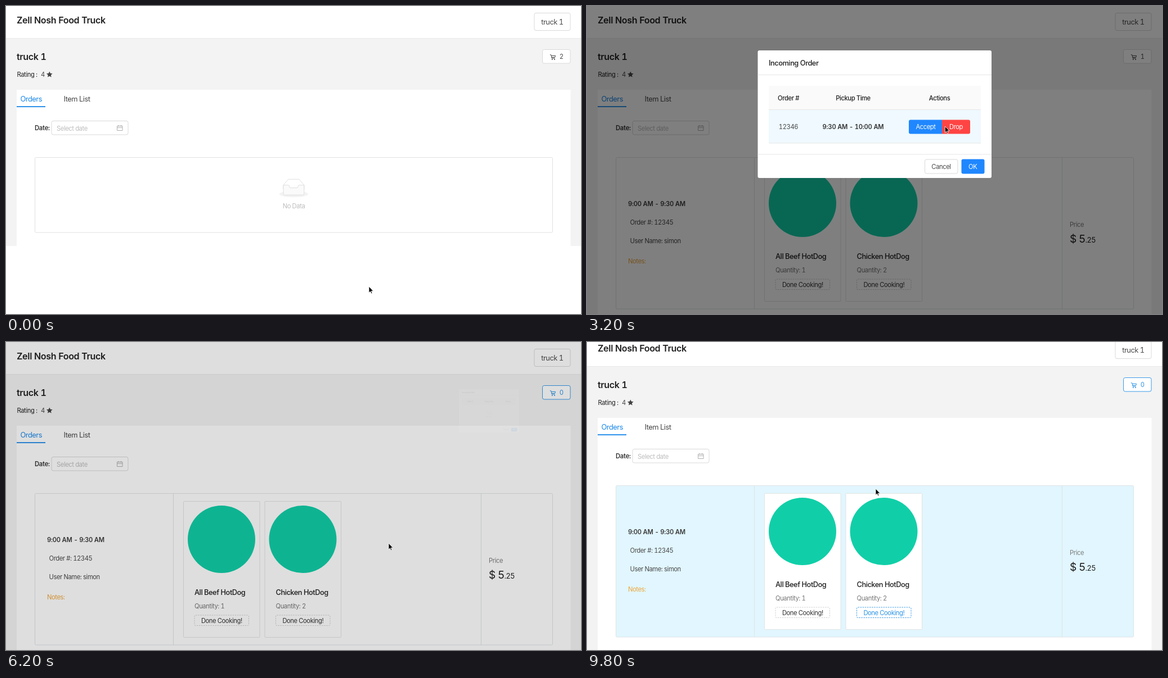
An HTML page for the animation above (10000 ms loop, 1022 by 548 pixels).

```html
<!DOCTYPE html>
<html lang="en">
<head>
<meta charset="utf-8">
<title>Food truck orders</title>
<style>
  html, body { margin: 0; width: 100%; height: 100%; overflow: hidden; background: #fff; }
  svg { display: block; width: 100vw; height: 100vh; }
  text {
    font-family: Inter, Roboto, sans-serif;
    font-variant-numeric: tabular-nums;
    letter-spacing: -.036em;
    white-space: pre;
  }
  text[font-weight="600"] { letter-spacing: -.02em; }
</style>
</head>
<body>
<svg id="stage" viewBox="0 0 1022 548"></svg>
<script>
const stage = document.getElementById('stage');
const LOOP = 10000, STEP = 200;
const BLUE = '#1f87ff', LINK = '#1887e8', INK = '#484848', DARK = '#1f1f1f', PALE = '#bdbdbd', EDGE = '#d9d9d9', RULE = '#e6e6e6';

// Keys are [time, value, ...]; values run straight between them.
function at(keys, t, i = 1) {
  const n = keys.findIndex(k => k[0] > t);
  if (n < 0) return keys[keys.length - 1][i];
  if (n === 0) return keys[0][i];
  const a = keys[n - 1], b = keys[n];
  return a[i] + (b[i] - a[i]) * (t - a[0]) / (b[0] - a[0]);
}

const pointer = [
  [0, 645, 499], [200, 650, 490], [600, 830, 270], [1000, 975, 92], [1400, 975, 90],
  [1600, 880, 140], [2000, 591, 246], [2200, 600, 216], [2800, 601, 214], [3400, 654, 214],
  [4400, 659, 218], [5200, 661, 224], [5800, 681, 357], [6200, 680, 358], [6600, 679, 364],
  [7000, 672, 386], [7400, 638, 398], [7800, 559, 410], [8200, 532, 476], [9000, 530, 478],
  [9400, 522, 390], [9800, 513, 261]
];
const shade = [[1200, 0], [1400, .15], [1600, .42], [1800, .5], [6000, .5], [6200, .13], [6400, 0]];
const zoom = [[1200, 0], [1400, .15], [1600, .8], [1800, 1], [6000, 1], [6200, .07], [6400, 0]];
const scroll = [[6400, 0], [6800, 9], [7000, 17.5], [7200, 16], [7400, 14.5], [7600, 14]];

const rect = (x, y, w, h, fill, stroke = 'none', r = 0, more = '') =>
  `<rect x="${x}" y="${y}" width="${w}" height="${h}" rx="${r}" fill="${fill}" stroke="${stroke}" ${more}/>`;
const path = (d, stroke, fill = 'none', more = '') =>
  `<path d="${d}" stroke="${stroke}" fill="${fill}" ${more}/>`;
// y is the middle of the line of capitals.
const text = (x, y, s, size = 11.2, fill = INK, weight = 400, anchor = 'start') =>
  `<text x="${x}" y="${y + size * .36}" font-size="${size}" fill="${fill}" font-weight="${weight}" text-anchor="${anchor}">${s}</text>`;
const mid = (x, y, s, size, fill, weight) => text(x, y, s, size, fill, weight, 'middle');

function star(cx, cy, r) {
  let d = '';
  for (let i = 0; i < 10; i++) {
    const a = i * Math.PI / 5, q = i % 2 ? r * .48 : r;
    d += `${i ? 'L' : 'M'}${cx + q * Math.sin(a)} ${cy - q * Math.cos(a)}`;
  }
  return path(d + 'Z', 'none', '#444');
}

const empty = y => `<g transform="translate(485.8 ${y}) scale(.8)">
  <ellipse cx="32" cy="34" rx="32" ry="7" fill="#f3f3f3"/>
  ${path('M55 14L45 2Q44 1 43 1H21Q20 1 19 2L9 14V23H55Z', EDGE, '#fff')}
  ${path('M41.6 17Q41.6 14 44 14H55V32Q55 36 52 36H12Q9 36 9 32V14H20Q22.4 14 22.4 17Q22.4 20 25 20H39Q41.6 20 41.6 17Z', EDGE, '#fafafa')}
  </g>` + mid(511.5, y + 48, 'No Data', 11.2, PALE);

function header(cart, count) {
  const ink = cart ? '#2b93e6' : INK;
  return rect(0, 57, 1022, 1, '#e9e9e9')
    + text(19, 25, 'Zell Nosh Food Truck', 16, DARK, 600)
    + rect(939, 12.5, 64, 31, '#fff', EDGE, 3) + mid(971, 28.5, 'truck 1', 12.8)
    + text(19, 90, 'truck 1', 16, DARK, 600)
    + rect(953.5, 77.5, 49.5, 24.5, '#fff', cart ? '#3b9ae8' : EDGE, 3)
    + path('M966.8 86.8H968.8L970.2 93H975.6M969.2 88.4H976.6L975.6 91.4H969.8', ink)
    + `<circle cx="970.8" cy="95" r="1" fill="${ink}"/><circle cx="975" cy="95" r="1" fill="${ink}"/>`
    + mid(987.3, 90, count, 11.2, ink)
    + text(19.5, 122, 'Rating', 11.2, DARK) + text(53, 122, ':', 11.2, DARK)
    + text(62, 122, '4') + star(77.3, 122, 5.6);
}

function panel(bottom) {
  return rect(19, 149, 984.5, bottom - 149, '#fff')
    + text(25.5, 165, 'Orders', 12.8, LINK) + rect(19, 178.2, 51, 1.8, LINK)
    + text(102.5, 165, 'Item List', 12.8)
    + text(51, 217, 'Date:', 11.2, '#333', 600)
    + rect(81, 204.5, 136, 24.5, '#fff', EDGE, 3)
    + text(90, 217.5, 'Select date', 11.2, PALE)
    + path('M197.5 213.5H207V221.5H197.5ZM197.5 216.3H207M200 211.8V214.5M204.5 211.8V214.5', '#b0b0b0');
}

function card(x, name, amount, active) {
  const ink = active ? '#2b93e6' : '#333';
  return rect(x + .5, 283.5, 135.5, 242, '#fff', '#e3e3e3', 1)
    + `<circle cx="${x + 68}" cy="351" r="60" fill="#10cfa8"/>`
    + text(x + 20, 445, name, 12.8, DARK, 500)
    + text(x + 20, 469.5, 'Quantity: ' + amount, 11.2, '#777')
    + rect(x + 20, 486, 96.5, 18.5, '#fff', active ? '#3b9ae8' : '#cfcfcf', 2, 'stroke-dasharray="2.5 1.6"')
    + mid(x + 68.3, 495.5, 'Done Cooking!', 11.2, ink);
}

function order(hover, done) {
  return rect(51.5, 269.5, 920, 269.5, hover ? '#e1f6fe' : '#fff', '#dfe3e5', 2)
    + path('M297.5 269V539M844.5 269V539', '#dfe3e5')
    + text(73, 352, '9:00 AM - 9:30 AM', 11.2, '#3a3a3a', 600)
    + text(76.5, 384.5, 'Order #: 12345') + text(76.5, 417.5, 'User Name: simon')
    + text(73, 454, 'Notes:', 11.2, '#eea63a')
    + card(315, 'All Beef HotDog', 1, false) + card(459.5, 'Chicken HotDog', 2, done)
    + text(858, 388.5, 'Price', 11.2, '#7d7d7d')
    + `<text x="858" y="421" font-size="19.2" fill="${DARK}">$ 5<tspan font-size="12.8">.25</tspan></text>`;
}

function modalRow(y, id, slot, hover) {
  return (hover ? rect(323, y, 377, 59, '#eff9ff') : '')
    + rect(323, y + 58.5, 377, 1, RULE)
    + mid(358, y + 30, id) + mid(473, y + 30, slot, 11.2, '#333', 600)
    + path(`M631 ${y + 17.5}H575a3 3 0 0 0-3 3V${y + 39.5}a3 3 0 0 0 3 3H631Z`, 'none', BLUE)
    + path(`M631 ${y + 17.5}H678a3 3 0 0 1 3 3V${y + 39.5}a3 3 0 0 1-3 3H631Z`, 'none', '#ff4443')
    + mid(602, y + 30, 'Accept', 11.2, '#fff') + mid(656, y + 30, 'Drop', 11.2, '#fff');
}

function modal(rows, my) {
  const bottom = rows ? 247 + rows * 59 : 380;
  const cols = rows ? [358, 473, 626.5] : [379, 512, 644];
  const slots = [['12345', '9:00 AM - 9:30 AM'], ['12346', '9:30 AM - 10:00 AM']].slice(2 - rows);
  let s = rect(303.5, 79, 415.5, bottom - 79, '#fff', 'none', 3)
    + text(323, 101, 'Incoming Order', 12.8, DARK, 500)
    + rect(303.5, 122, 415.5, 1, RULE)
    + rect(323, 142, 377, 42.5, '#fafafa') + rect(323, 184, 377, 1, RULE);
  ['Order #', 'Pickup Time', 'Actions'].forEach((h, i) => s += mid(cols[i], 164, h, 11.2, DARK, 500));
  slots.forEach(([id, slot], i) => {
    const y = 185 + i * 59;
    s += modalRow(y, id, slot, my >= y && my < y + 59);
  });
  if (!rows) s += empty(222.7) + rect(323, 318, 377, 1, RULE);
  return s + rect(303.5, bottom - 42.5, 415.5, 1, RULE)
    + rect(600.5, bottom - 33, 58.5, 25, '#fff', EDGE, 3) + mid(629.5, bottom - 20, 'Cancel')
    + rect(665.5, bottom - 33.5, 41, 26, BLUE, 'none', 3) + mid(685.7, bottom - 20, 'OK', 11.2, '#fff');
}

function render(t) {
  const x = at(pointer, t), y = at(pointer, t, 2);
  const accepted = t >= 2400, dropped = t >= 3800;
  const cart = (t >= 1000 && t < 1600) || t >= 6200;
  const bottom = accepted ? 562.5 : 427;
  const p = at(zoom, t), dim = at(shade, t), k = .2 + .8 * p;

  let s = `<g transform="translate(0 ${-at(scroll, t)})">`
    + rect(0, 57, 1022, bottom - 57, '#f3f3f3')
    + header(cart, dropped ? 0 : accepted ? 1 : 2) + panel(bottom)
    + (accepted ? order(t >= 6400, t >= 8200)
      : rect(51.5, 269.5, 920, 133.5, '#fff', '#e1e1e1', 2) + empty(307.5))
    + '</g>';
  if (t >= 6800 && t <= 7400) s += rect(1015.5, 14, 5.5, 534, '#727272', 'none', 2.7);
  if (dim) s += rect(0, 0, 1022, 548, '#000', 'none', 0, `opacity="${dim}"`);
  if (p) s += `<g opacity="${p}" transform="translate(978 86) scale(${k}) translate(-978 -86)">`
    + modal(dropped ? 0 : accepted ? 1 : 2, y) + '</g>';
  s += `<g transform="translate(${x} ${y})">`
    + path('M0 0V11.3L2.6 8.9L4.3 12.8L6 12L4.3 8.2H7.8Z', '#fff', '#000', 'stroke-width=".8"') + '</g>';
  stage.innerHTML = s;
}

let last = -1;
function tick() {
  const t = Math.floor(performance.now() % LOOP / STEP) * STEP;
  if (t !== last) render(last = t);
  requestAnimationFrame(tick);
}
tick();
</script>
</body>
</html>
```
